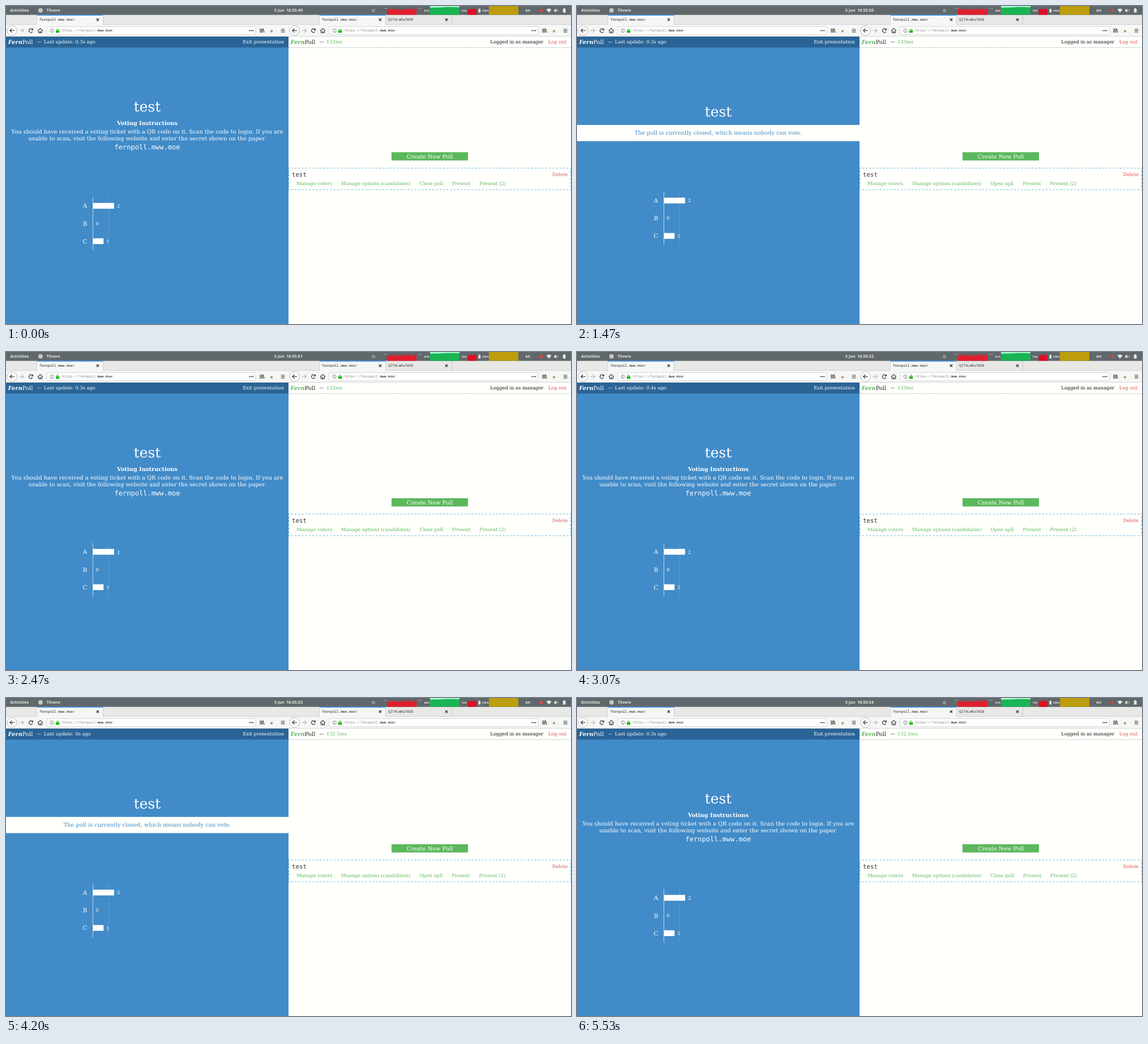
An HTML page with a canvas that plays this animation: 998x561 px, repeating every 5.59 s.

```html
<!DOCTYPE html>
<html lang="en">
<head>
<meta charset="utf-8">
<title>Poll demo</title>
<style>
html, body { margin: 0; width: 100%; height: 100%; overflow: hidden; background: #418bc8; }
canvas { display: block; width: 998px; height: 561px; }
</style>
</head>
<body>
<canvas id="stage" width="998" height="561"></canvas>
<script>
const ctx = document.getElementById('stage').getContext('2d');
const LOOP = 5590, STEP = 1000 / 15;
const SERIF = '"DejaVu Serif", serif';
const MONO = '"DejaVu Sans Mono", monospace';
const UI = '"Noto Sans", sans-serif';
const UIMONO = '"Noto Sans Mono", monospace';
const BLUE = '#418bc8', GREEN = '#5cb85c', RED = '#d9534f', PAPER = '#fffffc';
const BODY = 8.32, LARGE = 9.9;
const HOST = 'fernpoll.';
const DOMAIN = 'mww.moe';

function rect(x, y, w, h, color) {
  ctx.fillStyle = color;
  ctx.fillRect(x, y, w, h);
}

function text(str, x, y, size, color, family = SERIF, align = 'left', style = '') {
  ctx.font = `${style} ${size}px ${family}`;
  ctx.textAlign = align;
  ctx.fillStyle = color;
  ctx.fillText(str, x, y);
  return ctx.measureText(str).width;
}

function line(points, color, width = 1, dash = [], offset = 0) {
  ctx.beginPath();
  points.forEach(([x, y]) => ctx.lineTo(x, y));
  ctx.strokeStyle = color;
  ctx.lineWidth = width;
  ctx.setLineDash(dash);
  ctx.lineDashOffset = offset;
  ctx.stroke();
  ctx.setLineDash([]);
}

// Dashes are fitted to the side so that both ends carry half a dash.
function dashedSide(x1, y1, x2, y2, color, width) {
  const length = Math.hypot(x2 - x1, y2 - y1);
  const dash = length / (2 * Math.round(length / (6 * width)));
  line([[x1, y1], [x2, y2]], color, width, [dash, dash], dash / 2);
}

function shape(points, color) {
  ctx.beginPath();
  points.forEach(([x, y]) => ctx.lineTo(x, y));
  ctx.fillStyle = color;
  ctx.fill();
}

function disc(x, y, r, color) {
  ctx.beginPath();
  ctx.arc(x, y, r, 0, 7);
  ctx.fillStyle = color;
  ctx.fill();
}

function arc(x, y, r, from, to, color, width = 1) {
  ctx.beginPath();
  ctx.arc(x, y, r, from, to);
  ctx.strokeStyle = color;
  ctx.lineWidth = width;
  ctx.stroke();
}

function noise(n) {
  const v = Math.sin(n * 127.1 + 31.7) * 43758.5453;
  return v - Math.floor(v);
}

// Number of times in the list that have passed: odd means switched.
const flipped = (t, times) => times.filter(at => t >= at).length % 2 === 1;

function stateAt(t) {
  const age = (t + 300) % 500;
  const tick = Math.floor((t + 500) / 1200);
  return {
    second: 49 + Math.floor((t + 360) / 1000),
    age: Math.round(age / 100) / 10,
    tick,
    load: tick === 1 || tick === 3 ? 86 : 87,
    ping: t < 3700 ? '133ms' : '132.5ms',
    closed: flipped(t, [700, 2200, 3200, 5200]),
    canOpen: flipped(t, [450, 1730, 2800, 4930])
  };
}

function drawPanel(s) {
  const ink = '#e6e6e2';
  rect(0, 0, 998, 15.5, '#60686b');
  text('Activities', 7.3, 10.4, 7.1, ink, UI, 'left', 'bold');
  disc(61, 7.8, 4, '#c3c6c5');
  text('Tilvero', 71.5, 10.4, 7.1, ink, UI, 'left', 'bold');
  text('5 Jun', 474, 10.4, 7.1, ink, UI, 'left', 'bold');
  text('16:55:' + s.second, 524, 10.4, 7.2, ink, UI, 'right', 'bold');
  disc(649, 8, 3.2, '#8b9193');

  text('Freq', 666.5, 5, 3.2, '#c5c8c8', UI);
  for (let i = 0; i < 52; i++) {
    const n = i + s.tick;
    const h = 8 + 3.5 * noise(n) + (noise(n * 3 + 1) > .75 ? 2 : 0);
    rect(673 + i, 15.5 - h, 1, h, '#e01f2d');
  }
  text('2.4GHz', 726.5, 5, 2.6, '#c5c8c8', UI);
  text(s.load + '%', 738.8, 10, 4.6, ink, UI, 'left', 'bold');
  rect(749, 0, 52, 4, '#aaf5d0');
  shape([[749, 15.5], [749, 3], [770, 2.5], [779, 1.8], [801, 2.2], [801, 15.5]], '#1bb454');
  text(s.tick % 2 ? '75%' : '76%', 804.5, 10, 4.6, ink, UI, 'left', 'bold');
  shape([[815.5, 15.5], [815.5, 6], [819, 6], [821, 5], [826, 5.6], [829, 4.7], [831, 5], [831, 15.5]], '#dc1026');
  rect(834.5, 5.5, 3.6, 6, ink);
  rect(835.4, 4.5, 1.8, 1.2, ink);
  text('100%', 840.5, 10, 4.6, ink, UI, 'left', 'bold');
  rect(853, 0, 52, 15.5, '#bd9d0b');

  text('en', 917.3, 10.4, 7.2, ink, UI, 'left', 'bold');
  disc(945.5, 8, 2.6, '#ef3e3e');
  shape([[954.5, 6.3], [956.5, 5], [959, 4.5], [961.5, 5], [963.5, 6.3], [959, 11.7]], ink);
  shape([[968, 6.4], [969.8, 6.4], [972, 4.4], [972, 11.4], [969.8, 9.5], [968, 9.5]], ink);
  arc(972, 8, 2, -.9, .9, ink, .8);
  arc(972, 8, 4, -.9, .9, '#a5aaaa', .8);
  rect(983.7, 5, 4.8, 6.6, ink);
  rect(985, 3.8, 2.2, 1.5, ink);
}

function drawCross(x, y) {
  line([[x - 2.2, y - 2.2], [x + 2.2, y + 2.2]], '#222', 1.1);
  line([[x + 2.2, y - 2.2], [x - 2.2, y + 2.2]], '#222', 1.1);
}

function drawBrowser(left, secondTab) {
  const ink = '#3c3c3c';
  ctx.save();
  ctx.translate(left, 0);
  rect(0, 15.5, 499, 17.5, '#e8e8e7');
  rect(0, 32.4, 499, .6, '#c4c4c4');
  rect(0, 33, 499, 21, '#f5f6f6');
  rect(54.5, 15.5, 117, 18, '#f5f6f6');
  rect(54.5, 15.5, 117, 1.3, '#0a84ff');
  rect(54, 16, .6, 17, '#c4c4c4');
  rect(171, 16, .6, 17, '#b8b8b8');
  text(HOST + DOMAIN + '/', 59, 26, 6.15, '#222', UIMONO);
  drawCross(162, 24.2);
  if (secondTab) {
    text('QZT4LmRa7W38', 176, 26, 6.15, '#333', UIMONO);
    drawCross(279, 24.2);
    rect(288, 16, .6, 17, '#b8b8b8');
  }
  rect(0, 53.3, 499, .7, '#c9c9c9');

  disc(10.5, 43.3, 8.6, '#fff');
  arc(10.5, 43.3, 8.6, 0, 7, '#999', .7);
  line([[15, 43.3], [6.8, 43.3]], ink, 1.2);
  line([[10.5, 39.7], [6.8, 43.3], [10.5, 46.9]], ink, 1.2);
  line([[23.5, 43.3], [31.5, 43.3]], '#b5b5b5', 1.1);
  line([[28, 39.9], [31.5, 43.3], [28, 46.7]], '#b5b5b5', 1.1);
  arc(44, 43.4, 3.3, .5, 5.4, ink, 1.2);
  shape([[48, 39], [48, 43], [44.2, 43]], ink);
  line([[56, 43.6], [60.5, 39.5], [65, 43.6]], ink, 1.1);
  line([[57.5, 43], [57.5, 47.2], [63.5, 47.2], [63.5, 43]], ink, 1.1);
  rect(59.6, 44.4, 1.8, 3, ink);

  ctx.beginPath();
  ctx.roundRect(72, 36.4, 369, 14.2, 1.2);
  ctx.fillStyle = '#fff';
  ctx.fill();
  ctx.strokeStyle = '#c6c6c6';
  ctx.lineWidth = .7;
  ctx.stroke();
  arc(81, 43.4, 3.3, 0, 7, '#666', .7);
  rect(80.6, 42.8, .9, 2.6, '#666');
  rect(80.6, 41.2, .9, .9, '#666');
  rect(88, 43, 6.2, 4.2, '#12bc00');
  arc(91.1, 42.7, 1.9, Math.PI, Math.PI * 2, '#12bc00', 1.1);
  let x = 99.3;
  x += text('https://' + HOST, x, 45.4, 6.1, '#858585', UIMONO);
  x += text(DOMAIN, x, 45.4, 6.1, '#111', UIMONO);
  text('/', x, 45.4, 6.1, '#858585', UIMONO);
  for (const dx of [-3, 0, 3]) disc(433.4 + dx, 43.4, 1.05, ink);
  for (const dx of [0, 2, 4]) rect(448.5 + dx, 39.5 + dx % 4 / 4, 1.1, 7.5 - dx % 4 / 4, ink);
  line([[454, 39.8], [456.2, 47]], ink, 1.1);
  rect(467, 42.4, 4, 4, '#c79a62');
  for (const y of [40.5, 43, 45.5]) rect(485.8, y, 6.6, 1, ink);
  ctx.restore();
}

function drawBrand(left, first, second) {
  const w = text('Fern', left + 3.7, 66.8, LARGE, first, SERIF, 'left', 'italic bold');
  text('Poll', left + 3.7 + w, 66.8, LARGE, second);
  text('—', left + 54.6, 66.4, BODY, second);
}

function drawChart(top) {
  line([[153.5, top], [153.5, top + 94]], '#bfd8ec', 1);
  line([[181.5, top], [181.5, top + 94]], '#8fbce1', .7, [1.6, 1.5]);
  [['A', 2], ['B', 0], ['C', 1]].forEach(([name, votes], i) => {
    const mid = top + 15.4 + i * 31.2;
    const length = votes * 18.7;
    text(name, 139.5, mid + 3.8, 10.4, '#fff', SERIF, 'center');
    if (votes) rect(153.6, mid - 5.1, length, 10.2, '#fff');
    text(votes, 158.6 + length, mid + 3, BODY, '#fff');
  });
}

function drawPresentation(s) {
  const mid = 249.5;
  rect(0, 54, 499, 507, BLUE);
  rect(0, 54, 499, 19.3, '#2a6496');
  drawBrand(0, '#fff', '#fff');
  text(`Last update: ${s.age}s ago`, 67, 66.4, BODY, '#fff');
  text('Exit presentation', 491, 66.4, BODY, '#fff', SERIF, 'right');

  text('test', mid, s.closed ? 195 : 185.8, 24.9, '#fff', SERIF, 'center');
  if (s.closed) {
    rect(0, 209.8, 499, 28.6, PAPER);
    text('The poll is currently closed, which means nobody can vote.', mid, 227.4, LARGE, BLUE, SERIF, 'center');
  } else {
    text('Voting Instructions', mid, 210.3, LARGE, '#fff', SERIF, 'center', 'bold');
    text('You should have received a voting ticket with a QR code on it. Scan the code to login. If you are', mid, 224.9, LARGE, '#fff', SERIF, 'center');
    text('unable to scan, visit the following website and enter the secret shown on the paper.', mid, 236.9, LARGE, '#fff', SERIF, 'center');
    text(HOST + DOMAIN, mid, 253.4, 12.05, '#fff', MONO, 'center');
  }
  drawChart(s.closed ? 327.8 : 337.1);
}

function drawManager(s) {
  rect(499, 54, 499, 507, PAPER);
  drawBrand(499, GREEN, '#222');
  text(s.ping, 566, 66.4, BODY, GREEN);
  text('Logged in as manager', 949.3, 66.4, BODY, '#111', SERIF, 'right');
  text('Log out', 990, 66.4, BODY, RED, SERIF, 'right');
  line([[499, 73.4], [998, 73.4]], '#6b8a8a', .7, [1.6, 1.5]);

  rect(681, 258, 135, 14.5, GREEN);
  text('Create New Poll', 748.6, 268.7, LARGE, '#fff', SERIF, 'center');

  const edge = '#5bb3dc';
  dashedSide(499, 286, 998, 286, edge, 1.04);
  dashedSide(499, 324, 998, 324, edge, 1.04);
  dashedSide(499.5, 285.5, 499.5, 324.5, edge, 1.04);
  dashedSide(997.5, 285.5, 997.5, 324.5, edge, 1.04);
  text('test', 505.1, 300.5, 10.7, '#333', MONO);
  text('Delete', 992.2, 299.9, BODY, RED, SERIF, 'right');
  let x = 513.3;
  for (const label of ['Manage voters', 'Manage options (candidates)', s.canOpen ? 'Open opll' : 'Close poll', 'Present', 'Present (2)'])
    x += text(label, x, 315.8, BODY, GREEN) + 15.95;
}

function draw(now) {
  const t = Math.floor((now % LOOP + 4) / STEP) * STEP;
  const s = stateAt(t);
  ctx.textRendering = 'geometricPrecision';
  drawPresentation(s);
  drawManager(s);
  drawBrowser(0, false);
  drawBrowser(499, true);
  drawPanel(s);
}

let start;
function loop(now) {
  start ??= now;
  draw(now - start);
  requestAnimationFrame(loop);
}
draw(0);
requestAnimationFrame(loop);
</script>
</body>
</html>
```
